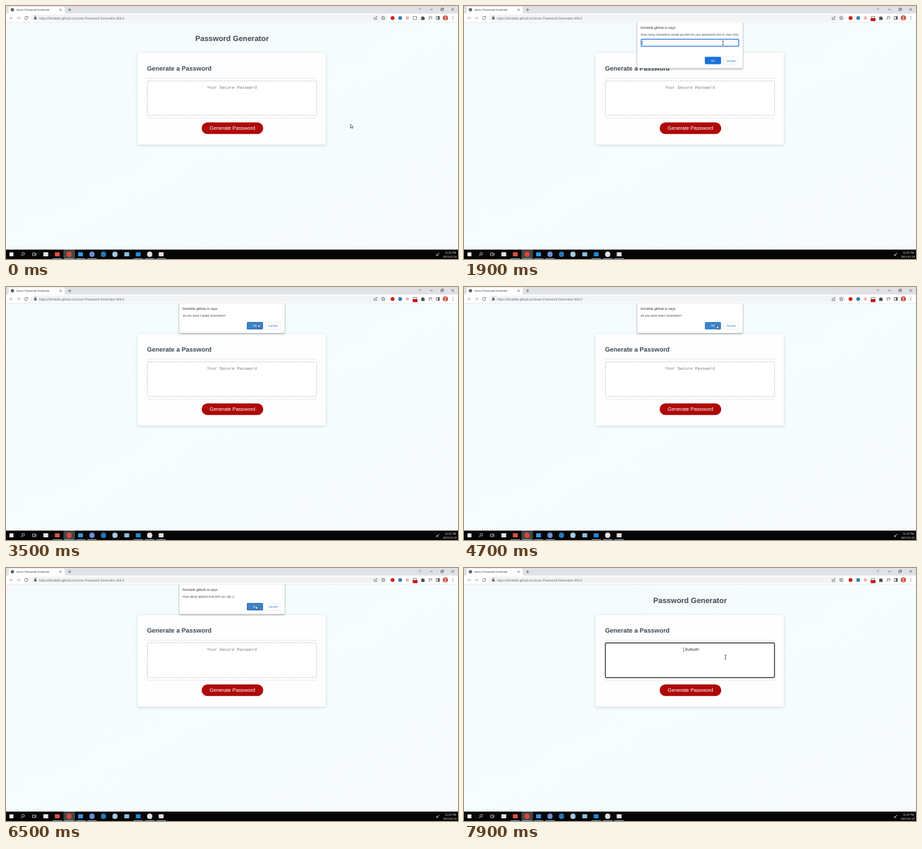
An HTML page that plays this animation: 670 px wide and 376 px high, repeating every 8000 ms.

```html
<!DOCTYPE html>
<html lang="en">
<head>
<meta charset="utf-8">
<title>Password Generator</title>
<style>
html, body { margin: 0; width: 100%; height: 100%; overflow: hidden; background: #f6fcfd; }
svg { display: block; width: 670px; height: 376px; font-family: "Liberation Sans", Arial, sans-serif; text-rendering: geometricPrecision; }
.card { filter: drop-shadow(0 1px 2px rgba(60, 80, 90, .22)); }
.box { filter: drop-shadow(0 1px 1.5px rgba(0, 0, 0, .4)); }
.bold { font-weight: bold; fill: #3b4a54; }
.mono { font: 6.17px "Liberation Mono", "Courier New", monospace; text-anchor: middle; }
.line { fill: none; stroke: #5f6368; stroke-width: .8; }
.mid { text-anchor: middle; }
</style>
</head>
<body>
<svg viewBox="0 0 670 376">
  <defs>
    <linearGradient id="bg" x1="0" y1="0" x2="1" y2="1">
      <stop offset="0" stop-color="#f5fbfd"/>
      <stop offset=".5" stop-color="#f5fdfd"/>
      <stop offset="1" stop-color="#f7fbfd"/>
    </linearGradient>
  </defs>

  <!-- page -->
  <rect y="24" width="670" height="338" fill="url(#bg)"/>
  <text class="bold mid" x="335" y="52.2" font-size="11.15">Password Generator</text>
  <rect class="card" x="195" y="70" width="279" height="136" rx="2" fill="#fefefe"/>
  <text class="bold" x="209" y="96.3" font-size="9.44">Generate a Password</text>
  <path d="M209 107.3H460.5M209 166.8H460.5" stroke="#e2e5e7" stroke-width=".8"/>
  <rect id="area" x="209.5" y="111.3" width="250.8" height="51.5" rx="1.5" fill="#fff"/>
  <text id="out" class="mono" x="335" y="123"></text>
  <rect x="290" y="173" width="91.3" height="17.3" rx="8.65" fill="#ae0808"/>
  <text class="mid" x="335.5" y="184.2" font-size="7.63" fill="#fff">Generate Password</text>

  <!-- dialog -->
  <g id="dialog">
    <rect id="panel" class="box" x="257" y="20" width="156" rx="1.5" fill="#fff"/>
    <text x="262" y="34.3" font-size="5.2" fill="#303438">brindole.github.io says</text>
    <text id="ask" x="262" y="44.2" font-size="4.5" fill="#3c4043"></text>
    <g id="field">
      <rect x="262.6" y="49.3" width="144.6" height="10.6" rx="1" fill="#fff" stroke="#2b7bdc" stroke-width="1.3"/>
      <text id="typed" x="265" y="56.4" font-size="4.5" fill="#202124">8</text>
      <rect id="caret" x="264.3" y="51.8" width=".6" height="5.8" fill="#333"/>
    </g>
    <g id="btns">
      <rect id="ok" x="357" y="0" width="24" height="11" rx="1.5"/>
      <rect id="ring" x="357.5" y=".5" width="23" height="10" rx="1.2" fill="none" stroke="#245f9e" stroke-dasharray="1 .6"/>
      <text class="mid" x="369" y="7.1" font-size="4.3" fill="#fff">OK</text>
      <rect x="384.3" y=".3" width="22.6" height="10.4" rx="1.5" fill="#fff" stroke="#dfe3e8" stroke-width=".6"/>
      <text class="mid" x="395.7" y="7.1" font-size="4.3" fill="#1a66c8">Cancel</text>
    </g>
  </g>

  <!-- browser bar -->
  <rect width="670" height="11.5" fill="#dfe1e5"/>
  <path d="M2 11.5Q4 11 4 9V3Q4 .8 6 .8H85Q87 .8 87 3V9Q87 11 89 11.5Z" fill="#fff"/>
  <rect y="11.3" width="670" height="12.7" fill="#fff"/>
  <path d="M0 24.2H670" stroke="#dde1e4" stroke-width=".6"/>
  <circle cx="9.5" cy="5.6" r="2.5" fill="#5f6368"/>
  <text x="15" y="7.1" font-size="4.05" fill="#3c4043">Jova's Password Generator</text>
  <path class="line" d="M79.3 4.1l3 3m0-3l-3 3M92 5.6h4.6m-2.3-2.3v4.6"/>
  <path class="line" d="M611.8 3.5l1.7 1.7 1.7-1.7M628.5 5.2h4M660.3 3.2l3.8 3.8m0-3.8l-3.8 3.8"/>
  <path class="line" d="M644.6 4.2h2.8v2.8h-2.8zM645.5 4v-.9h2.9v2.9h-.8"/>
  <g class="line" stroke="#a7abaf">
    <path style="stroke:#a9adb1" d="M10.6 17.8H5.6m2.2-2.2l-2.2 2.2 2.2 2.2M15.8 17.8h5m-2.2-2.2l2.2 2.2-2.2 2.2"/>
  </g>
  <path class="line" d="M31.6 16.4a2.3 2.3 0 1 0 .5 1.8M32.2 15v1.9h-1.9"/>
  <rect x="36.5" y="12.8" width="529" height="9.8" rx="4.9" fill="#f1f3f4"/>
  <rect x="41.7" y="17" width="3.6" height="3" rx=".4" fill="#5f6368"/>
  <path class="line" d="M42.4 17v-1a1.1 1.1 0 0 1 2.2 0v1"/>
  <text x="49" y="19.5" font-size="4.9" fill="#686d72">https://brindole.github.io/Jovas-Password-Generator-M3U/</text>
  <path class="line" d="M545.8 16.6v3.4h3.8v-1.4M547 18.2q.4-2 2.8-2m-1-1l1 1-1 1"/>
  <path class="line" d="M559.2 15l.8 1.8 1.9.2-1.4 1.3.4 1.9-1.7-1-1.7 1 .4-1.9-1.4-1.3 1.9-.2z"/>
  <circle cx="573" cy="17.8" r="2.9" fill="#c92020"/>
  <circle cx="584.3" cy="17.8" r="2.9" fill="#3c83b8"/>
  <circle cx="595" cy="17.8" r="2.5" fill="#eeb5b5"/>
  <rect x="603.8" y="15.4" width="4.6" height="4.6" fill="#fff" stroke="#6d7a76" stroke-width=".8"/>
  <rect id="badge" x="602.8" y="18" width="7.2" height="4.6" rx=".8" fill="#c5161d"/>
  <path fill="#4b4f53" d="M615.4 16.2h1.5a1 1 0 0 1 2 0h1.4v1.6a1 1 0 0 1 0 1.8v1.2h-4.9z"/>
  <path class="line" d="M626.5 16h4.6M626.5 17.8h2.6M626.5 19.6h2M631 16v3.6"/>
  <rect class="line" x="637.8" y="15.6" width="4.6" height="4.4"/>
  <rect x="640" y="15.6" width="2.4" height="4.4" fill="#5f6368"/>
  <circle cx="651.3" cy="17.8" r="3.8" fill="#c84438"/>
  <circle cx="651.3" cy="16.8" r="1.3" fill="#f1d6cb"/>
  <path d="M648.8 20.5q2.5-3.6 5 0z" fill="#f1d6cb"/>
  <path d="M662.3 15.3v.9m0 1.2v.9m0 1.2v.9" stroke="#4b4f53"/>

  <!-- taskbar -->
  <rect y="362" width="670" height="14" fill="#050505"/>
  <rect x="85.2" y="362" width="17" height="14" fill="#454545"/>
  <rect x="5.2" y="366.2" width="5.8" height="5.8" fill="#f2f2f2"/>
  <g class="line" style="stroke:#d6d6d6">
    <circle cx="25.6" cy="368.2" r="1.9" fill="none"/>
    <path d="M24.2 369.7l-2 2.1M39.5 367h3.4v4h-3.4zM44.4 366.6v4.8"/>
  </g>
  <g id="apps"></g>
  <path d="M637.5 371.5l4.8-4.4M638.2 369.2l2 2.2" stroke="#ddd" stroke-width=".9"/>
  <g font-size="3.95" fill="#eee" text-anchor="end">
    <text x="667.3" y="367.6">11:22 PM</text>
    <text x="668" y="374.1">2023-01-18</text>
  </g>

  <path id="arrow" d="M0 0V5.8L1.4 4.6 2.3 6.6 3.2 6.2 2.3 4.2H4.1Z" fill="#fff" stroke="#222" stroke-width=".6"/>
  <path id="beam" d="M-1.1-3H1.1M0-3V3M-1.1 3H1.1" stroke="#333" stroke-width=".7"/>
</svg>
<script>
const $ = id => document.getElementById(id);
const show = (id, on) => $(id).style.display = on ? '' : 'none';
const set = (id, attrs) => { for (const k in attrs) $(id).setAttribute(k, attrs[k]); };

const LOOP = 8000, STEP = 100;
const BADGE = 1500, TYPED = 2300, DONE = 6800, FOCUS = 7500;

// start, end, question, focus ring
const dialogs = [
  [1500, 3000, 'How many characters would you like for your password (min 8, max 132)', 0],
  [3100, 4100, 'do you want Capital characters?', 1],
  [4200, 5300, 'do you want lower characters?', 0],
  [5450, 6100, 'would like to add numbers to your password?', 1],
  [6150, DONE, 'How about special charcters (ie. |@,=)', 1]
];

// time, x, y of the pointer
const path = [
  [0, 510.5, 175.5], [500, 500, 177], [600, 500, 177], [1200, 341, 181], [1400, 340, 181],
  [1600, 384, 55], [2300, 384, 55], [2800, 369, 80], [3000, 369, 80], [3400, 361, 58],
  [3500, 373.5, 55], [4700, 374.5, 57], [5300, 364, 58], [5500, 364, 58], [6000, 370, 55],
  [6200, 370, 56], [6800, 370, 56], [6900, 370, 56], [7500, 387.5, 132.5], [8000, 387.5, 132.5]
];

const apps = [
  [59, 'box', '#dfe6ea', 0], [76, 'box', '#dc5148', 1], [93.5, 'dot', '#d4493c', 1],
  [110.5, 'box', '#3494dc', 1], [127.5, 'dot', '#6b8fd6', 1], [144.5, 'dot', '#2878b8', 0],
  [161.5, 'dot', '#a9c8e0', 0], [179, 'box', '#8fbfe0', 0], [196, 'box', '#2389d2', 1],
  [213, 'dot', '#e3dfe2', 1], [230, 'box', '#eadbd6', 1]
];
$('apps').innerHTML = apps.map(([x, kind, fill, open]) =>
  (kind === 'dot'
    ? `<circle cx="${x}" cy="369" r="3.9" fill="${fill}"/>`
    : `<rect x="${x - 3.6}" y="366" width="7.2" height="6" rx=".6" fill="${fill}"/>`) +
  (open ? `<rect x="${x - 7}" y="375" width="14" height="1" fill="#73a9cf"/>` : '')
).join('');

function pointer(t) {
  const i = path.findIndex(p => p[0] > t);
  const [t0, x0, y0] = path[i - 1], [t1, x1, y1] = path[i];
  const u = (t - t0) / (t1 - t0), e = u * u * (3 - 2 * u);
  return [x0 + (x1 - x0) * e, y0 + (y1 - y0) * e];
}

function drawDialog(t, x, y) {
  const d = dialogs.find(([from, to]) => t >= from && t < to);
  show('dialog', d);
  if (!d) return;
  const [from, , text, ring] = d;
  const prompt = d === dialogs[0];
  const k = Math.min(1, (t - from) / 100);
  const top = prompt ? 75.5 : 52;
  const hover = x > 357 && x < 381 && y > top && y < top + 11;
  set('dialog', { transform: `translate(0 ${-4 * (1 - k)})`, opacity: .84 + .16 * k });
  set('panel', { height: prompt ? 72.5 : 48.5 });
  set('btns', { transform: `translate(0 ${top})` });
  set('ok', { fill: prompt && !hover ? '#1a73d8' : '#3a84cc' });
  $('ask').textContent = text;
  show('ring', ring);
  show('field', prompt);
  show('typed', t >= TYPED);
  show('caret', t >= 1900 && t < TYPED);
}

function draw(t) {
  const [x, y] = pointer(t);
  const done = t >= DONE, focus = t >= FOCUS;
  const beam = (t >= 1600 && t < 2500) || (done && y > 112);
  drawDialog(t, x, y);
  show('badge', t >= BADGE);
  $('out').textContent = done ? '`[9uHuDr' : 'Your Secure Password';
  set('out', { fill: done ? '#25292c' : '#777' });
  set('area', {
    stroke: focus ? '#202326' : '#b3b8bc',
    'stroke-width': focus ? 1.2 : .8,
    'stroke-dasharray': focus ? 'none' : '2 1.3'
  });
  show('arrow', !beam);
  show('beam', beam);
  set(beam ? 'beam' : 'arrow', { transform: `translate(${x} ${y})` });
}

const begin = performance.now();
function tick() {
  const t = (performance.now() - begin) % LOOP;
  draw(Math.floor(t / STEP) * STEP);
  requestAnimationFrame(tick);
}
tick();
</script>
</body>
</html>
```
